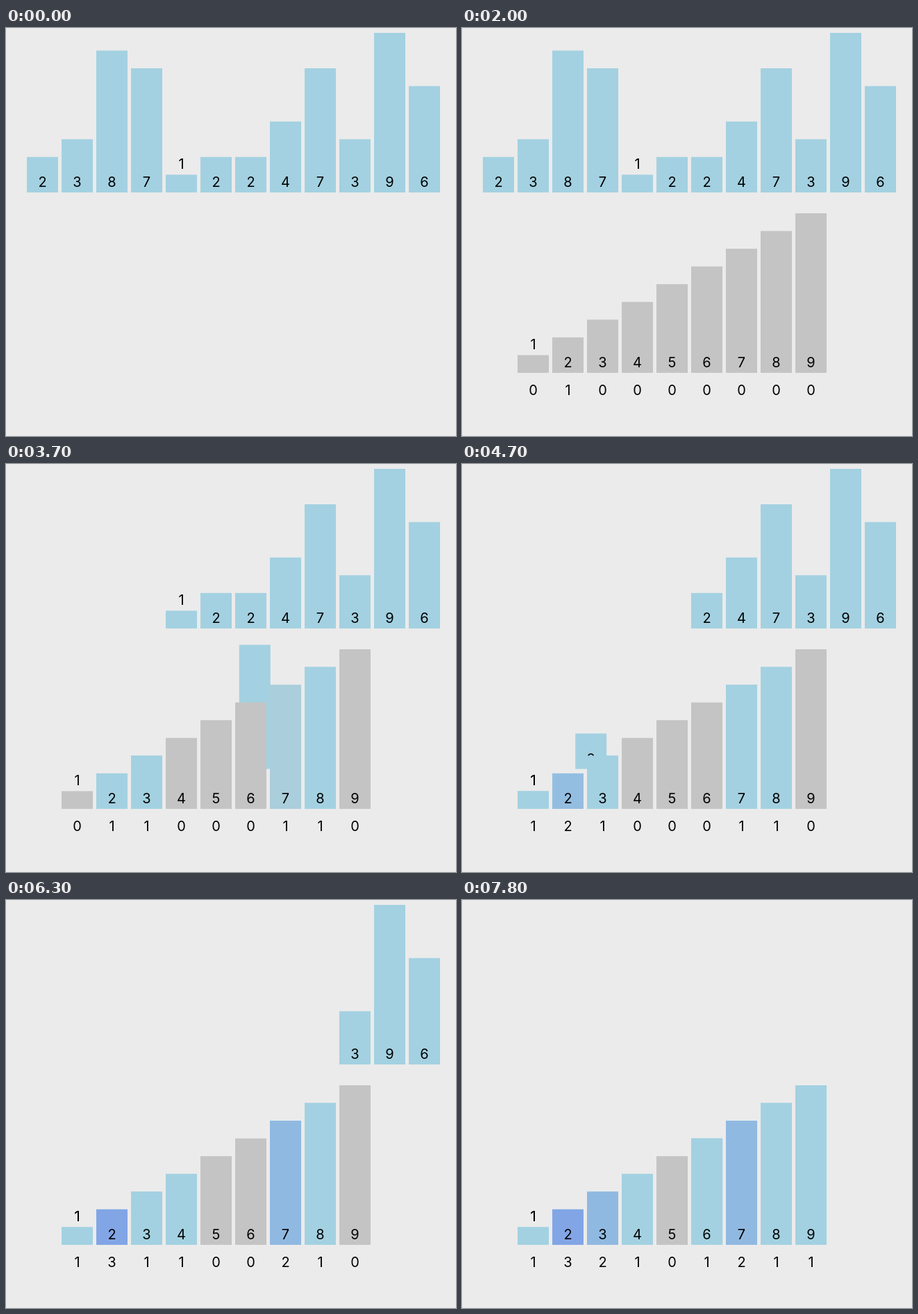
Write an HTML page that moves like this. It is 648x588 px and loops after 8 s.

```html
<!DOCTYPE html>
<html lang="en">
<head>
<meta charset="utf-8">
<title>Counting sort</title>
<style>
  html, body { margin: 0; width: 100%; height: 100%; overflow: hidden; background: #ebebeb; }
  svg { display: block; width: 648px; height: 588px; }
  text { font: 20px Inter, "Liberation Sans", sans-serif; text-anchor: middle; fill: #000; }
</style>
</head>
<body>
<svg viewBox="0 0 648 588">
  <g id="input"></g>
  <g id="buckets"></g>
</svg>
<script>
const LOOP = 8000, DURATION = 315;
const LABELS_AT = 1500, GROW_AT = 1508, FIRST_MOVE = 2000;
const BAR = 45, STEP = 50, UNIT = 230 / 9, LEFT = 30;
const TOP_BASE = 237, LOW_BASE = 497, COUNT_Y = 529;
const VALUES = [2, 3, 8, 7, 1, 2, 2, 4, 7, 3, 9, 6];
const BLACK = [0, 0, 0];
// Fill by number of items in a bucket
const FILLS = [[196, 196, 196], [163, 209, 225], [144, 185, 225], [130, 165, 230]];

const rgb = c => `rgb(${c.map(Math.round)})`;
const mix = (a, b, p) => a.map((v, i) => v + (b[i] - v) * p);
const bucketX = value => LEFT + STEP * value;
const moveStart = i => FIRST_MOVE + 500 * i + (i % 2 ? 6 : 0);

// Cubic ease in and out
function progress(time, start) {
  const t = Math.min(1, Math.max(0, (time - start) / DURATION));
  return t < 0.5 ? 4 * t ** 3 : 1 - 4 * (1 - t) ** 3;
}

function add(parent, name, attrs, text = "") {
  const el = document.createElementNS("http://www.w3.org/2000/svg", name);
  set(el, attrs);
  el.textContent = text;
  parent.append(el);
  return el;
}

function set(el, attrs) {
  for (const key in attrs) el.setAttribute(key, attrs[key]);
}

function addBar(parent, value, x, base) {
  const g = add(parent, "g", {});
  const height = UNIT * value;
  const rect = add(g, "rect", { x, y: base - height, width: BAR, height, fill: rgb(FILLS[1]) });
  // A short bar carries its label on top
  const labelY = value === 1 ? base - height - 8 : base - 8;
  add(g, "text", { x: x + BAR / 2, y: labelY }, value);
  return { g, rect, height };
}

const input = document.getElementById("input");
const buckets = document.getElementById("buckets");

const items = VALUES.map((value, i) => {
  const x = LEFT + STEP * i;
  return { ...addBar(input, value, x, TOP_BASE), dx: bucketX(value) - x, start: moveStart(i) };
});

const slots = Array.from({ length: 9 }, (_, i) => {
  const value = i + 1, x = bucketX(value);
  const bar = addBar(buckets, value, x, LOW_BASE);
  const count = add(bar.g, "text", { x: x + BAR / 2, y: COUNT_Y }, "0");
  const hits = VALUES.map((v, k) => v === value ? moveStart(k) : -1).filter(s => s >= 0);
  return { ...bar, count, hits };
});

function drawItem(item, time) {
  const p = progress(time, item.start);
  set(item.g, { transform: `translate(${item.dx * p} ${(LOW_BASE - TOP_BASE) * p})` });
}

function drawSlot(slot, time) {
  const grown = progress(time, GROW_AT);
  const count = slot.hits.filter(s => time >= s).length;
  const fill = count
    ? mix(FILLS[count - 1], FILLS[count], progress(time, slot.hits[count - 1]))
    : mix(BLACK, FILLS[0], grown);
  set(slot.rect, { width: BAR * grown, height: slot.height * grown, fill: rgb(fill) });
  slot.count.textContent = count;
}

const origin = performance.now();

function draw() {
  const time = (performance.now() - origin) % LOOP;
  items.forEach(item => drawItem(item, time));
  slots.forEach(slot => drawSlot(slot, time));
  set(buckets, { visibility: time < LABELS_AT ? "hidden" : "visible" });
  requestAnimationFrame(draw);
}
draw();
</script>
</body>
</html>
```
